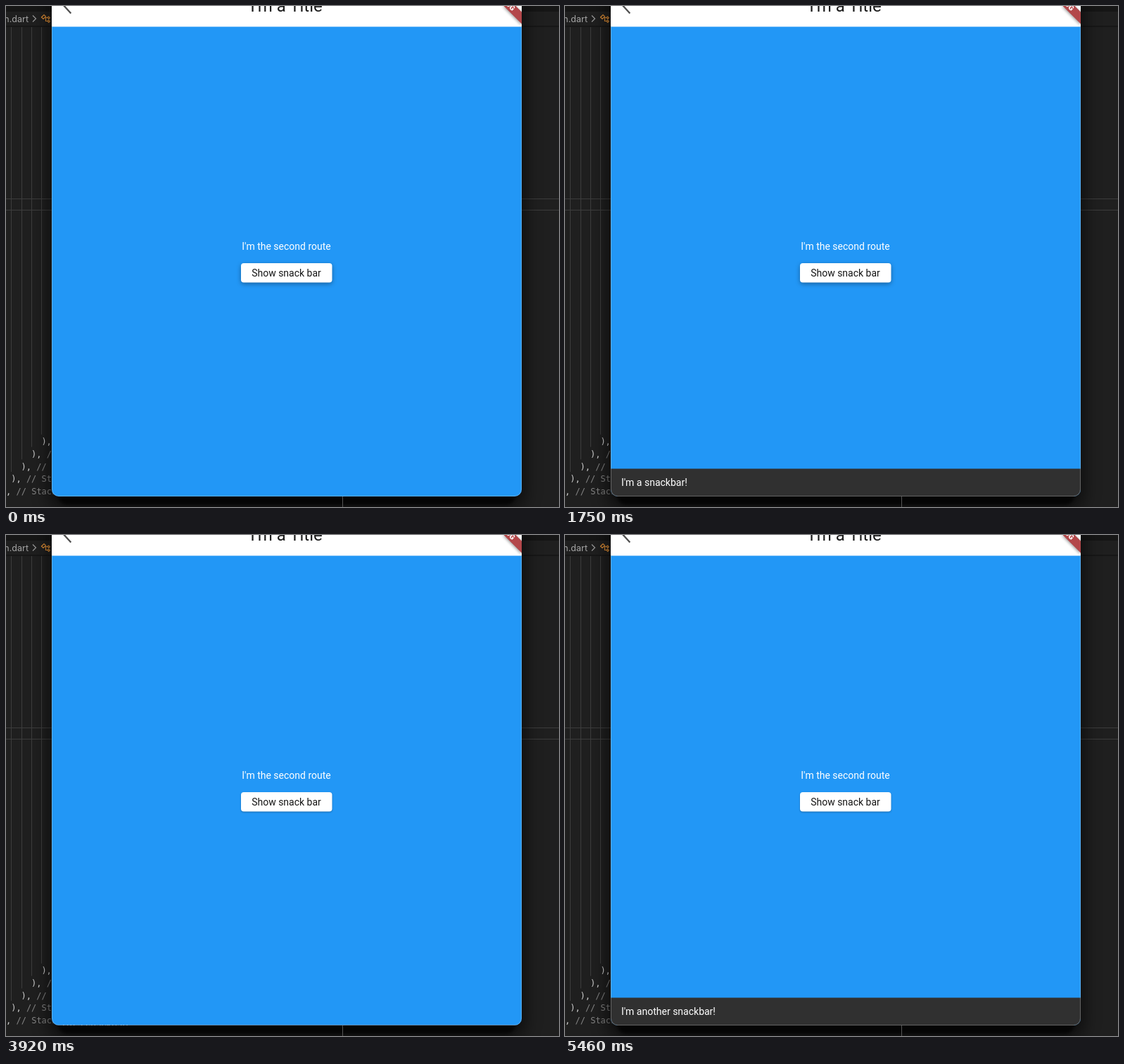
An HTML page for the animation above (5670 ms loop, 786x713 px).

```html
<!DOCTYPE html>
<html lang="en">
<head>
<meta charset="utf-8">
<title>Snack bar demo</title>
<style>
  html, body { margin: 0; width: 100%; height: 100%; overflow: hidden; background: #1f1f1f; }
  svg { display: block; width: 786px; height: 713px; }
  .ui { font: 14px Roboto, sans-serif; }
  .code { font: 12px "DejaVu Sans Mono", monospace; fill: #d0d0d0; white-space: pre; }
  .comment { fill: #858585; }
</style>
</head>
<body>
<svg viewBox="0 0 786 713" xmlns="http://www.w3.org/2000/svg">
  <defs>
    <filter id="soft" x="-20%" y="-20%" width="140%" height="140%"><feGaussianBlur stdDeviation="12"/></filter>
    <filter id="tight" x="-20%" y="-20%" width="140%" height="140%"><feGaussianBlur stdDeviation="2"/></filter>
    <clipPath id="windowClip"><rect x="65" y="-40" width="668" height="738" rx="10"/></clipPath>
    <clipPath id="barClip"><rect id="barClipRect" x="65" y="698" width="668" height="0"/></clipPath>
  </defs>

  <rect width="786" height="713" fill="#1f1f1f"/>
  <g id="editor"></g>

  <!-- breadcrumb -->
  <rect width="786" height="8" fill="#161616"/>
  <rect y="28" width="786" height="2" fill="#171717"/>
  <text x="32" y="22.5" text-anchor="end" fill="#a6a6a6" font-size="12.5" font-family="Inter, sans-serif">main.dart</text>
  <path d="M38 13.5l4.5 4.5l-4.5 4.5" fill="none" stroke="#999" stroke-width="1.2"/>
  <g fill="none" stroke="#dc8c35" stroke-width="1.2">
    <path d="M50.5 16l3.5-3.5l2.500 2.500l-3.500 3.500z M55 16.500h4 M56.500 16.500v5h2.500"/>
    <path d="M59 16.500l1.500-1.500l1.800 1.800l-1.500 1.500z M59 21.500l1.500-1.500l1.800 1.800l-1.500 1.500z"/>
  </g>

  <!-- window shadow -->
  <rect x="61" y="-40" width="676" height="755" rx="18" opacity=".6" filter="url(#soft)"/>
  <rect x="74" y="640" width="650" height="70" rx="14" opacity=".65" filter="url(#tight)"/>
  <path d="M478.5 698V713" stroke="#555"/>

  <g clip-path="url(#windowClip)" class="ui">
    <rect x="65" y="-40" width="668" height="738" fill="#2297f6"/>
    <rect x="65" y="-40" width="668" height="69.500" fill="#fff"/>
    <text x="398.500" y="8" text-anchor="middle" font-size="24" fill="#1c1c1c">I'm a Title</text>
    <path d="M80 -3L92.300 10.500" stroke="#505050" stroke-width="2.300"/>
    <path d="M706 0L733 27V10L723 0z" opacity=".45" filter="url(#tight)"/>
    <path d="M707.500 0L733 25.500V8.500L724.500 0z" fill="#b3474a"/>
    <text transform="translate(719.500 7.500) rotate(45)" text-anchor="end" font-size="10.200" font-weight="900" fill="#fff">DEBUG</text>

    <text x="398.500" y="347" text-anchor="middle" fill="#fff">I'm the second route</text>
    <rect id="button" x="334" y="366" width="129.500" height="27.500" rx="4" fill="#fff"/>
    <text x="398.500" y="385" text-anchor="middle" fill="#161616">Show snack bar</text>

    <g clip-path="url(#barClip)">
      <rect x="65" y="650" width="668" height="48" fill="#303030"/>
      <text id="message" x="80" fill="#fff"></text>
    </g>
  </g>
  <path d="M65.500 30V688a9.500 9.500 0 0 0 9.500 9.500H723a9.500 9.500 0 0 0 9.500-9.500V30" fill="none" stroke="#fff" stroke-opacity=".25"/>
</svg>
<script>
const LOOP = 5670, STEP = 70, BOTTOM = 698, BAR_HEIGHT = 39.5;
const $ = id => document.getElementById(id);
const clamp = v => Math.min(1, Math.max(0, v));

// Cubic bezier (.4, 0, .2, 1), solved by bisection.
function fastOutSlowIn(x) {
  if (x <= 0 || x >= 1) return clamp(x);
  let low = 0, high = 1;
  for (let i = 0; i < 24; i++) {
    const s = (low + high) / 2, r = 1 - s;
    if (1.2 * s * r * r + 0.6 * s * s * r + s * s * s < x) low = s; else high = s;
  }
  return low * low * (3 - 2 * low);
}

function buildEditor() {
  const line = d => `<path d="${d}" stroke="#3d3d3d"/>`;
  let out = "";
  for (let i = 0; i < 4; i++) {
    out += line(`M${[7.5, 22.5, 36.5, 50.5][i]} 30V${663 - i * 17.7}`);
  }
  for (const y of [274.5, 290.5]) out += line(`M0 ${y}H786`);
  for (let i = 0; i < 5; i++) {
    out += `<text class="code" x="${50.4 - i * 14.4}" y="${624 + i * 17.8}">), ` +
      `<tspan class="comment">// Stack</tspan></text>`;
  }
  // The first closing bracket carries no comment.
  $("editor").innerHTML = out;
}

function barOpen(t) {
  if (t < 3680) return fastOutSlowIn((t - 319) / 250);
  if (t < 3980) return fastOutSlowIn(1 - (t - 3680) / 260);
  return fastOutSlowIn((t - 4015) / 250);
}

function render(time) {
  const t = Math.floor((time % LOOP) / STEP) * STEP;
  const height = BAR_HEIGHT * barOpen(t);
  $("barClipRect").setAttribute("y", BOTTOM - height);
  $("barClipRect").setAttribute("height", height);
  $("message").setAttribute("y", BOTTOM - height / 2 + 4.9);
  $("message").textContent = t < 3980 ? "I'm a snackbar!" : "I'm another snackbar!";

  const lift = 1 - clamp((t - 1960) / 210);
  $("button").style.filter =
    `drop-shadow(0 ${1 + lift}px ${1 + 2 * lift}px rgba(0,0,0,${0.3 + 0.05 * lift}))`;
}

buildEditor();
const start = performance.now();
function tick() {
  render(performance.now() - start);
  requestAnimationFrame(tick);
}
tick();
</script>
</body>
</html>
```
